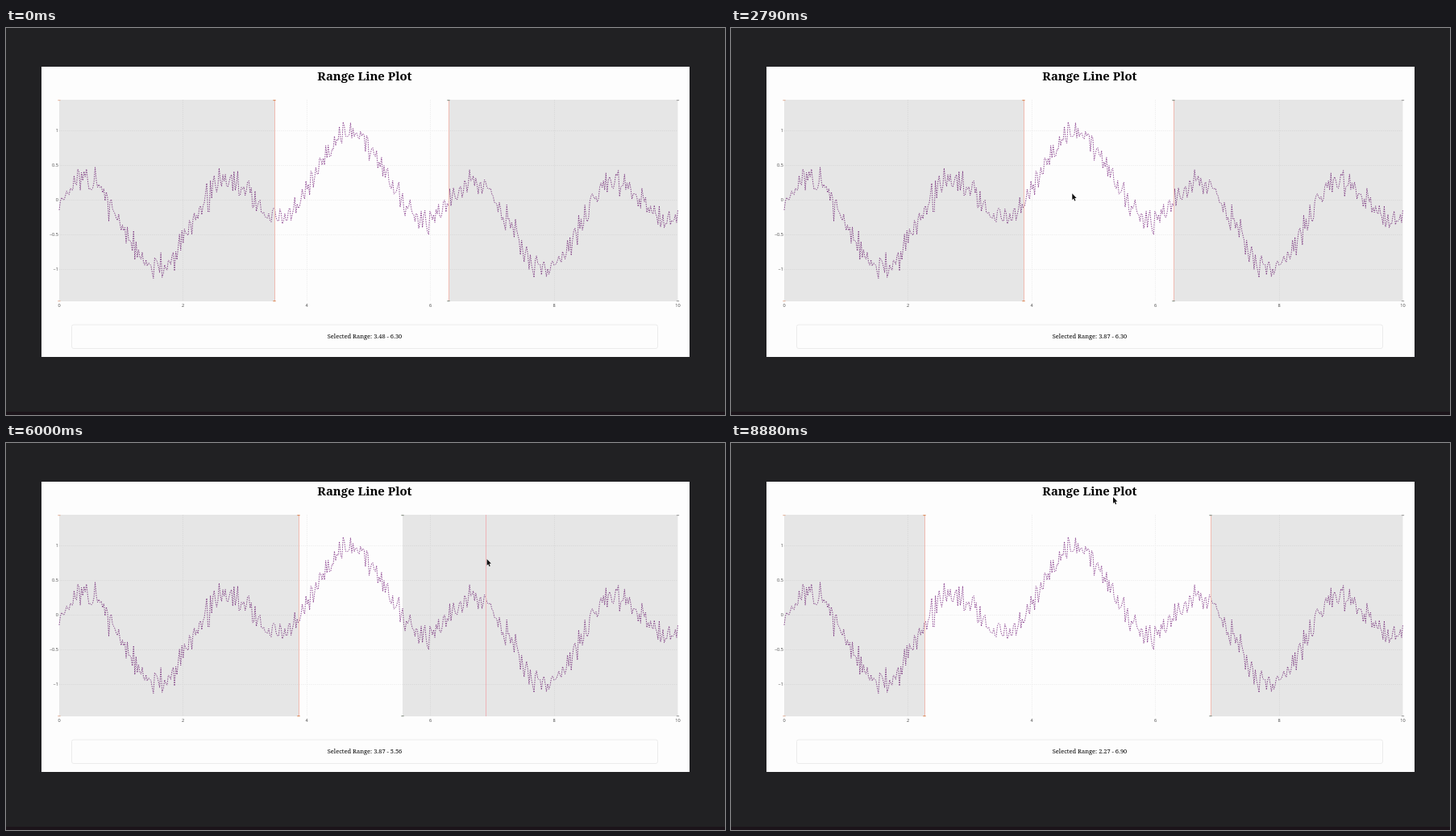
An HTML page with a canvas that plays this animation: 892 by 480 pixels, repeating every 9 s.

```html
<!DOCTYPE html>
<html lang="en">
<head>
<meta charset="utf-8">
<title>Range Line Plot</title>
<style>
html, body { margin: 0; width: 892px; height: 480px; overflow: hidden; background: #212123; }
canvas { display: block; }
</style>
</head>
<body>
<canvas id="stage" width="892" height="480"></canvas>
<script>
const ctx = document.getElementById('stage').getContext('2d');
const LOOP = 9000, TOP = 89, BOTTOM = 339, LEFT = 66, RIGHT = 833.5;
const px = v => LEFT + v * 76.75;
const py = v => 213 - v * 86;
const crisp = x => Math.floor(x) + .5;

let seed = 11;
const random = () => (seed = seed * 16807 % 2147483647) / 2147483647;
const noise = () => (random() + random() + random() - 1.5) * .2;
const curve = Array.from({ length: 500 }, (_, i) => {
  const x = i / 49.9;
  return [px(x), py(Math.sin(x) * Math.cos(2 * x) + noise())];
});

// A handle is pulled from start to stop; the plot follows on release.
const drags = [
  { start: 1200, stop: 1830, release: 2100, side: 0, from: 3.48, to: 3.87, y: 147, shift: 0 },
  { start: 3640, stop: 4240, release: 4320, side: 1, from: 6.30, to: 5.56, y: 140, shift: 0 },
  { start: 5540, stop: 6000, release: 6250, side: 1, from: 5.56, to: 6.90, y: 144, shift: 0 },
  { start: 7330, stop: 7850, release: 8050, side: 0, from: 3.87, to: 2.27, y: 177, shift: 4 }
];
const LABEL_DELAY = 140, LEAVE_DELAY = 300, HOVER = 200;
const enter = { t: 40, x: 474, y: 49 }, exit = { t: 8870, x: 474, y: 67 };

const mix = (a, b, k) => a + (b - a) * k;
const progress = (t, a, b) => {
  const k = Math.min(1, Math.max(0, (t - a) / (b - a)));
  return k * k * (3 - 2 * k);
};
const dragX = (d, t) => px(mix(d.from, d.to, progress(t, d.start, d.stop)));

// The pointer leads the handle a little and swings downwards between drags.
function pointerAt(t) {
  let last = enter;
  for (const d of drags) {
    const grab = { t: d.start - HOVER, x: px(d.from) + 1, y: d.y };
    if (t < grab.t) return travel(last, grab, t);
    last = { t: d.release + LEAVE_DELAY, x: px(d.to) + 1, y: d.y };
    if (t < last.t) return { x: dragX(d, t + 40) + 1, y: d.y };
  }
  return travel(last, exit, t);
}

function travel(a, b, t) {
  const k = progress(t, a.t, b.t);
  return { x: mix(a.x, b.x, k), y: mix(a.y, b.y, k) + 72 * Math.sin(Math.PI * k) };
}

const hovering = t => drags.some(d =>
  t >= d.start - HOVER && t < d.start || t >= d.release && t < d.release + LEAVE_DELAY);

function rect(color, x, y, w, h) {
  ctx.fillStyle = color;
  ctx.fillRect(x, y, w, h);
}

function line(color, x1, y1, x2, y2, dash = []) {
  ctx.strokeStyle = color;
  ctx.lineWidth = 1;
  ctx.setLineDash(dash);
  ctx.beginPath();
  ctx.moveTo(x1, y1);
  ctx.lineTo(x2, y2);
  ctx.stroke();
  ctx.setLineDash([]);
}

function text(str, x, y, font, color = '#000', align = 'center') {
  ctx.font = font;
  ctx.fillStyle = color;
  ctx.textAlign = align;
  ctx.fillText(str, x, y);
}

function drawPlot() {
  const font = '5.6px "Open Sans", sans-serif', grid = '#f0f0f0', dots = [1.5, 1];
  for (let v = 0; v <= 10; v += 2) {
    const x = crisp(px(v));
    if (v % 10) line(grid, x, TOP, x, BOTTOM, dots);
    text(v, px(v), 345.8, font, '#444');
  }
  for (let v = -1; v <= 1; v += .5) {
    const y = crisp(py(v));
    line(grid, LEFT, y, RIGHT, y, dots);
    text(String(v).replace('-', '\u2212'), LEFT - 1, y + 1.5, font, '#444', 'right');
  }
  ctx.strokeStyle = '#76237c';
  ctx.lineWidth = .85;
  ctx.setLineDash([1.4, 1.4]);
  ctx.beginPath();
  curve.forEach(p => ctx.lineTo(...p));
  ctx.stroke();
  ctx.setLineDash([]);
}

function drawHandles(x, color) {
  for (const y of [TOP, BOTTOM - 1]) rect(color, x - 1.6, y, 3.2, 1.2);
}

function drawPointer(shape, { x, y }) {
  ctx.save();
  ctx.translate(x, y);
  ctx.lineWidth = 1;
  ctx.strokeStyle = '#fff';
  ctx.stroke(shape);
  ctx.fillStyle = '#111';
  ctx.fill(shape);
  ctx.restore();
}

const arrow = new Path2D('M0 0V8L1.7 6.3L3 9.2L4.2 8.6L3 5.8L5.4 5.6Z');
const cross = new Path2D();
for (let i = 0; i < 4; i++) {
  cross.addPath(new Path2D('M-.7 0V-2.6H-2.1L0-4.9L2.1-2.6H.7V0Z'), new DOMMatrix().rotate(i * 90));
}

function draw(t) {
  const range = [3.48, 6.30], label = [3.48, 6.30];
  for (const d of drags) {
    if (t >= d.release) range[d.side] = d.to;
    if (t >= d.release + LABEL_DELAY) label[d.side] = d.to;
  }
  const active = drags.find(d => t >= d.start && t < d.release);
  const [left, right] = range.map(v => Math.floor(px(v)));

  rect('#212123', 0, 0, 892, 480);
  rect('#1b141a', 0, 476, 892, 4);
  rect('#fdfdfd', 44, 48, 804, 360);
  text('Range Line Plot', 445, 65, 'bold 14.9px "Noto Serif", serif');
  drawPlot();

  rect('rgba(0,0,0,.09)', LEFT, TOP, left - LEFT, BOTTOM - TOP);
  rect('rgba(0,0,0,.09)', right, TOP, RIGHT - right, BOTTOM - TOP);
  [left, right].forEach((x, side) => {
    if (active?.side !== side) line('#f0bcb2', x + .5, TOP, x + .5, BOTTOM);
  });
  if (active) {
    const x = crisp(dragX(active, t));
    line('#efb4b8', x, TOP + active.shift, x, BOTTOM + active.shift);
  }
  drawHandles(LEFT, '#e3b9a5');
  drawHandles(left, '#dd8f62');
  drawHandles(right, '#8d958b');
  drawHandles(RIGHT, '#a3a3a3');

  ctx.strokeStyle = '#ececec';
  ctx.lineWidth = 1;
  ctx.beginPath();
  ctx.roundRect(81.5, 368, 727, 29.5, 2.5);
  ctx.stroke();
  text(`Selected Range: ${label.map(v => v.toFixed(2)).join(' - ')}`, 445, 385.2,
    '7.5px "Noto Serif", serif');

  if (t >= enter.t) drawPointer(hovering(t) ? cross : arrow, pointerAt(t));
}

const start = performance.now();
function tick() {
  draw((performance.now() - start) % LOOP);
  requestAnimationFrame(tick);
}
tick();
</script>
</body>
</html>
```
